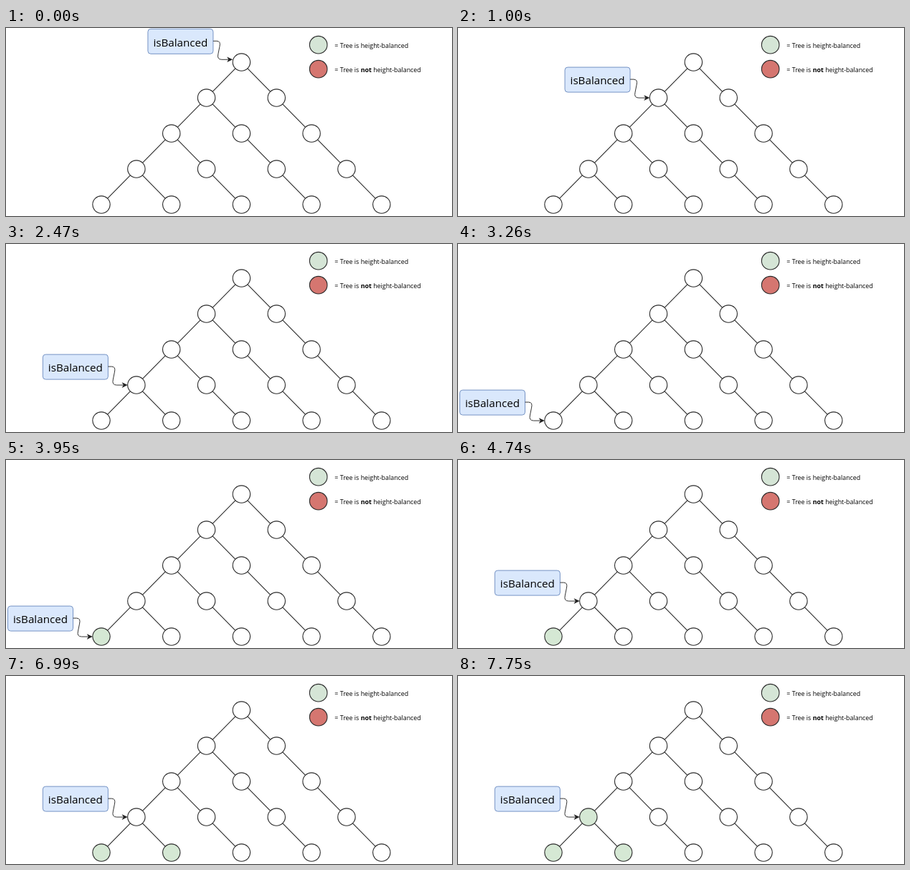
These frames come from a looping animation (622x264 px, 8000 ms). An HTML page:

```html
<!DOCTYPE html>
<html lang="en">
<head>
<meta charset="utf-8">
<title>Height-balanced tree</title>
<style>
  html, body { margin: 0; width: 100%; height: 100%; overflow: hidden; background: #fff; }
  svg { display: block; width: 622px; height: 264px; }
  text { font: 8.9px "Open Sans", sans-serif; fill: #000; }
  #pointer text { font-size: 15.2px; }
  #tree, .key { fill: #fff; stroke: #2a2a2a; stroke-width: 1.1; }
</style>
</head>
<body>
<svg viewBox="0 0 622 264">
  <g id="tree"></g>
  <circle class="key" cx="435.7" cy="23.7" r="12.3" style="fill:#d5e5d6"/>
  <circle class="key" cx="435.7" cy="57.7" r="12.3" style="fill:#d57670"/>
  <text x="458.3" y="28">= Tree is height-balanced</text>
  <text x="458.3" y="62">= Tree is <tspan font-weight="bold">not</tspan> height-balanced</text>
  <g id="pointer">
    <rect x="-130.5" y="-43" width="91" height="35" rx="4" fill="#dae8fc" stroke="#7593c4"/>
    <text x="-85" y="-18.8" text-anchor="middle">isBalanced</text>
    <path d="M-39.5-26h5q6 0 4 8l-2 10q-2 8 5 8h9" fill="none" stroke="#333"/>
    <path d="M-12.2 0l-8-3.8 2 3.8-2 3.8z" fill="#222"/>
  </g>
</svg>
<script>
const tree = document.getElementById("tree");
const pointer = document.getElementById("pointer");
const ROWS = 5, LOOP = 8000, GREEN = "#d5e8d4";

// Node j of a row, counted from the left.
const at = (row, j) => [133 + 48.85 * (4 - row + 2 * j), 48.1 + 50 * row];

function add(tag, attrs) {
  const el = document.createElementNS("http://www.w3.org/2000/svg", tag);
  for (const key in attrs) el.setAttribute(key, attrs[key]);
  return tree.appendChild(el);
}

function edge([x1, y1], [x2, y2]) {
  add("line", { x1, y1, x2, y2 });
}

// Every node has a right child; only the leftmost ones have a left child.
for (let row = 0; row < ROWS - 1; row++) {
  edge(at(row, 0), at(row + 1, 0));
  for (let j = 0; j <= row; j++) edge(at(row, j), at(row + 1, j + 1));
}

const nodes = [];
for (let row = 0; row < ROWS; row++) {
  nodes[row] = [];
  for (let j = 0; j <= row; j++) {
    const [cx, cy] = at(row, j);
    nodes[row][j] = add("circle", { cx, cy, r: 12.2 });
  }
}

// Calls: [time, row, j]; a node turns green when its own call returns.
const visits = [
  [0, 0, 0], [1000, 1, 0], [1690, 2, 0], [2470, 3, 0], [3260, 4, 0],
  [4740, 3, 0], [5520, 4, 1], [6990, 3, 0]
];
const results = [[3950, 4, 0], [6210, 4, 1], [7750, 3, 0]];

function draw(now) {
  const t = now % LOOP;
  const [, row, j] = visits.filter(v => v[0] <= t).pop();
  const [x, y] = at(row, j);
  // The first call points slightly above the root's centre.
  pointer.setAttribute("transform", `translate(${x} ${row ? y : y - 3.8})`);
  for (const [time, r, k] of results) nodes[r][k].style.fill = t >= time ? GREEN : "";
}

const start = performance.now();
function frame() {
  draw(performance.now() - start);
  requestAnimationFrame(frame);
}
frame();
</script>
</body>
</html>
```
